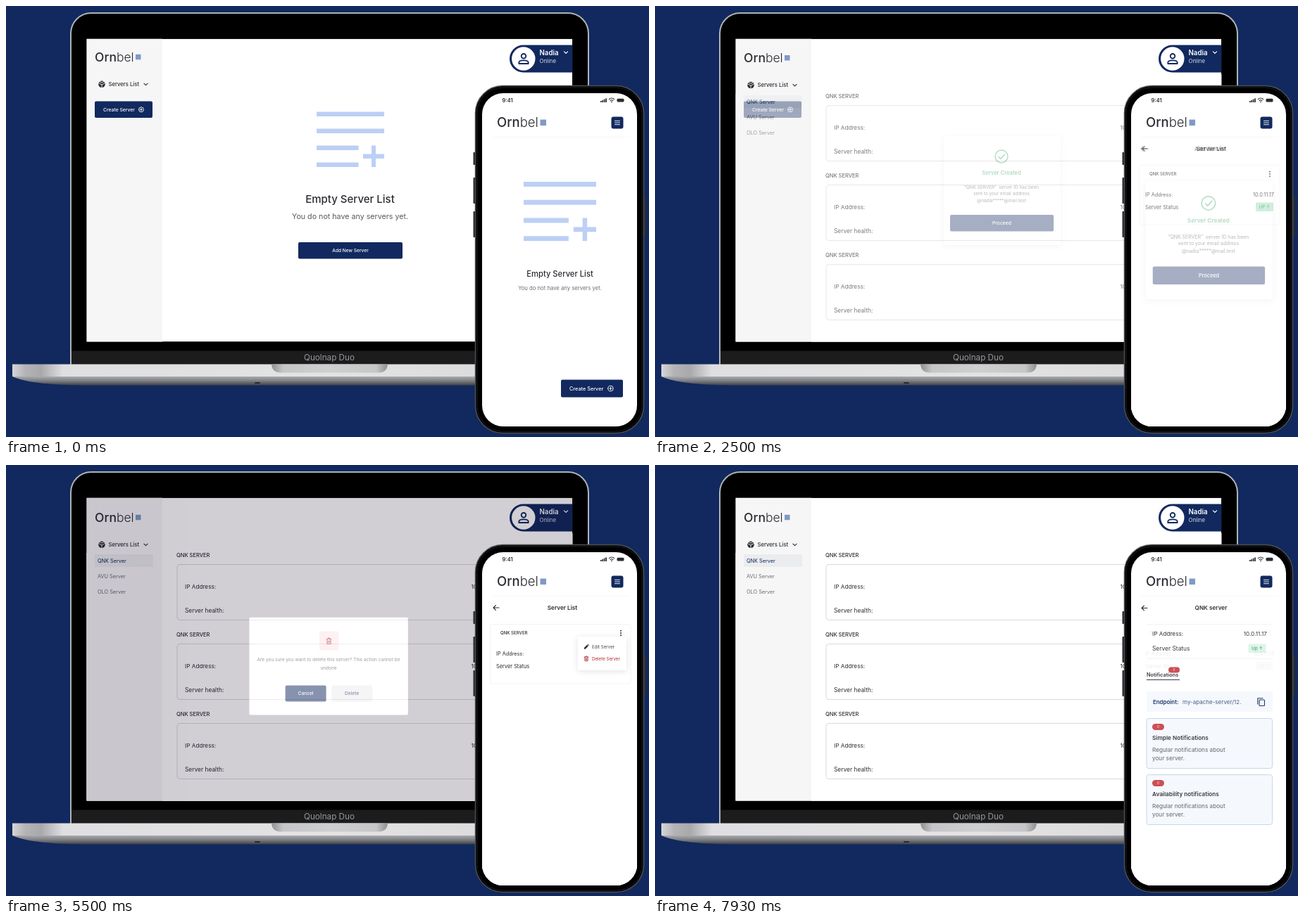
Write an HTML page that moves like this. It is 913 by 613 pixels and loops after 8 s.

```html
<!DOCTYPE html>
<html lang="en">
<head>
<meta charset="utf-8">
<title>Server dashboard on laptop and phone</title>
<style>
html, body { margin: 0; width: 100%; height: 100%; overflow: hidden; background: #11295e; }
svg { display: block; width: 100%; height: 100%; font-family: Inter, "Open Sans", sans-serif; }
</style>
</head>
<body>
<svg id="stage" viewBox="0 0 913 613" xmlns="http://www.w3.org/2000/svg"></svg>
<script>
const NAVY = '#11295e', INK = '#2b2d33', GREY = '#6b6e75', RED = '#b3262e', GREEN = '#2fa565';
const BRAND = ['Orn', 'bel'], USER = 'Nadia', IP = '10.0.11.17';
const MAIN = 'QNK', OTHERS = ['AVU', 'OLO'];
const LOOP = 8000;

// Drawing helpers; text y is the middle of the capitals
const text = (x, y, s, size, fill = INK, weight = 400, anchor = 'start') =>
  `<text x="${x}" y="${(y + size * 0.36).toFixed(2)}" font-size="${size}" fill="${fill}" font-weight="${weight}" text-anchor="${anchor}">${s}</text>`;
const mid = (x, y, s, size, fill, weight) => text(x, y, s, size, fill, weight, 'middle');
const rect = (x, y, w, h, fill, r = 0, extra = '') =>
  `<rect x="${x}" y="${y}" width="${w}" height="${h}" rx="${r}" fill="${fill}" ${extra}/>`;
const line = (d, color, w = 1, extra = '') =>
  `<path d="${d}" fill="none" stroke="${color}" stroke-width="${w}" stroke-linecap="round" stroke-linejoin="round" ${extra}/>`;
const group = (id, body) => `<g id="${id}">${body}</g>`;
const at = (x, y, k, body) => `<g transform="translate(${x} ${y}) scale(${k})">${body}</g>`;
const button = (x, y, w, h, label, size, fill = NAVY, color = '#fff') =>
  rect(x, y, w, h, fill, 2) + mid(x + w / 2, y + h / 2, label, size, color, 500);
const shadow = 'filter="url(#soft)"';

const trash = (x, y, k, c) => at(x, y, k,
  line('M-4 -3.5H4M-1.5 -4.8H1.5M-3 -3.2V4.4H3V-3.2M-1 -0.6V2M1 -0.6V2', c, 1.3));
const pencil = (x, y, k) => at(x, y, k,
  `<path d="M-4.5 4.5V2L1.6 -4.1 4.1 -1.6 -2 4.5ZM2.4 -4.7l1-.9 2.3 2.3-.9 1Z" fill="${INK}"/>`);
const arrow = (x, y) => line(`M${x + 4} ${y}H${x - 4}m3.4 -3.4l-3.4 3.4 3.4 3.4`, INK, 1.2);
const chevron = (x, y) => `M${x - 2.6} ${y - 1.2}l2.6 2.6 2.6 -2.6`;
const plusIcon = (x, y, r) =>
  line(`M${x - r} ${y}a${r} ${r} 0 1 0 ${2 * r} 0a${r} ${r} 0 1 0 ${-2 * r} 0M${x - r / 2} ${y}h${r}M${x} ${y - r / 2}v${r}`, '#fff', 0.9);
const logo = (x, y, size, box, boxX) =>
  `<text x="${x}" y="${y + size * 0.36}" font-size="${size}" fill="${INK}"><tspan font-weight="500">${BRAND[0]}</tspan><tspan font-weight="300">${BRAND[1]}</tspan></text>`
  + rect(boxX, y - box / 2, box, box, '#8199c6');

const emptyIcon = () => {
  const c = '#bccff5';
  return [0, 24].map(y => rect(0, y, 96, 6.5, c)).join('')
    + [48, 72].map(y => rect(0, y, 59.5, 6.5, c)).join('')
    + rect(66, 60, 30, 6.4, c) + rect(78, 48, 6, 30.5, c);
};

// 166 x 155 confirmation card
const successCard = () =>
  rect(0, 0, 166, 155, '#fff', 2, shadow)
  + `<circle cx="82" cy="29" r="9" fill="none" stroke="${GREEN}" stroke-width="1.4"/>`
  + line('M78 29.5l3 3 5.5 -6.5', GREEN, 1.5)
  + mid(82, 52, 'Server Created', 7.6, GREEN, 600)
  + mid(82, 73, `“${MAIN} SERVER”&#160; server ID has been`, 6.4, '#44464c')
  + mid(82, 82, 'sent to your email address', 6.4, '#44464c')
  + mid(82, 91.5, '@nadia*****@mail.test', 6.4, '#44464c')
  + button(9, 112, 147, 23.5, 'Proceed', 6.8);

const field = (x, y, w, h, label, size, hint = '') =>
  text(x, y, label, size, '#55585f')
  + rect(x, y + 8, w, h, '#fff', 2, 'stroke="#c9cbd0"')
  + text(x + 5, y + 8 + h / 2, hint, size * 0.85, '#b9bcc3');

// Laptop
const lapScreen = (fill) => rect(114.5, 46.7, 689.7, 430.8, fill);
const row = i => {
  const y = 113 * i;
  return text(242, 128 + y, MAIN + ' SERVER', 7.5, INK, 500)
    + rect(243, 141.5 + y, 544, 79, '#fff', 4, 'stroke="#d9d9dc"')
    + text(254, 173.5 + y, 'IP Address:', 8.2) + text(660.5, 173.5 + y, IP, 8.2)
    + text(254, 206.5 + y, 'Server health:', 8.4);
};
const laptopMain = body => rect(222, 97, 583, 381, '#fff') + body;
const dim = lapScreen('rgba(12,2,28,.38)');

const laptop =
  `<path d="M92 510V39A29 29 0 0 1 121 10H798A29 29 0 0 1 827 39V510Z" fill="#000" stroke="#b0b3b9" stroke-width="2"/>`
  + rect(93, 490.5, 733, 19.5, '#1c1c1d')
  + mid(459, 500, 'Quolnap Duo', 11.7, '#96979a', 400)
  + `<path d="M9 509.500H906V527H9Z" fill="url(#deck)"/>`
  + `<path d="M9 527H906V539.500H118C70 539.500 28 536 9 527Z" fill="url(#under)"/>`
  + `<path d="M377 509.500H542Q541 521.500 529 521.500H390Q378 521.500 377 509.500Z" fill="url(#notch)"/>`
  + rect(353, 535, 8, 2, '#2a2a2c', 1)
  + `<g clip-path="url(#lapClip)">`
  + lapScreen('#fff') + rect(114, 46, 108, 432, '#f6f6f7')
  + rect(715, 55.5, 130, 39, NAVY, 19.5)
  + `<circle cx="734.8" cy="75" r="16.7" fill="#fff"/><circle cx="735" cy="71.3" r="3.3" fill="none" stroke="${NAVY}" stroke-width="1.8"/>`
  + line('M728.3 82V80.5Q728.3 77.3 735 77.3T741.7 80.5V82Z', NAVY, 1.8)
  + text(757.5, 66.5, USER, 9.7, '#fff', 600) + text(757.5, 78.5, 'Online', 7.8, '#d5dbe8')
  + line(chevron(795, 66), '#fff', 1.2)
  + group('lapEmpty',
      at(441, 150.5, 1, emptyIcon())
      + mid(488.5, 275, 'Empty Server List', 15, INK, 500)
      + mid(488.5, 299, 'You do not have any servers yet.', 10.7, '#55585f')
      + button(415, 336, 148, 23.5, 'Add New Server', 6.6))
  + rect(126, 135.5, 82, 23.5, NAVY, 2) + text(138, 147.3, 'Create Server', 6.8, '#fff', 500) + plusIcon(192, 147.3, 3.5)
  + group('lapAdd', laptopMain(
      mid(489, 178, 'Add Server', 11.3, INK, 600)
      + field(415, 219, 148, 20, 'Server Name', 7.7)
      + field(415, 260, 148, 20, 'IP Address(optional)', 7.7)
      + button(415, 342, 148, 23.5, 'Done', 6.8)))
  + group('lapDone', laptopMain(at(410, 185, 1, successCard())))
  + group('lapList',
      rect(114, 125, 108, 353, '#f6f6f7')
      + rect(126, 127, 83, 18, '#ebecee')
      + text(130, 136, MAIN + ' Server', 7.3, NAVY)
      + OTHERS.map((n, i) => text(130, 158 + i * 22.3, n + ' Server', 7.3, GREY)).join('')
      + laptopMain([0, 1, 2].map(row).join('')))
  + group('lapHead',
      logo(126, 72.5, 17.5, 7.5, 184)
      + `<circle cx="136" cy="111.3" r="4.8" fill="${INK}"/>`
      + line('M131.6 109.7L136 112l4.4 -2.3M136 112v4.5M133 107.5l3 1.5 3 -1.5', '#f6f6f7', 0.9)
      + text(145.5, 111.3, 'Servers List', 7.7, INK, 500) + line(chevron(198.5, 111.3), INK, 1.1))
  + group('lapMenu',
      rect(598, 167, 90, 62, '#fff', 2, shadow)
      + pencil(612, 187.5, 0.95) + text(625, 187.5, 'Edit Server', 7.5, '#44464c')
      + trash(612, 206.5, 0.95, RED) + text(625, 207, 'Delete Server', 7.5, '#44464c'))
  + group('lapEdit', dim
      + rect(325, 167, 266, 239, '#fff', 2, shadow)
      + mid(458, 199, 'Edit Server', 11.3, INK, 600)
      + rect(325, 210.5, 266, 1, '#ececee')
      + field(384, 233.5, 148, 19, 'Server Name', 7.7)
      + field(384, 273.5, 148, 19, 'IP Address(optional)', 7.7)
      + button(384, 357, 148, 23, 'Done', 6.8))
  + group('lapDelete', dim
      + rect(345.4, 216.7, 225.4, 138.8, '#fff', 2)
      + rect(445, 236.5, 27, 27, '#fce4e4', 2) + trash(458.5, 250.5, 0.85, RED)
      + mid(458, 277, 'Are you sure you want to delete this server? This action cannot be', 6.5, '#3a3c42')
      + mid(458, 288.5, 'undone', 6.5, '#3a3c42')
      + button(396.6, 313.4, 58, 23, 'Cancel', 6.6)
      + button(462.2, 313.4, 58, 23, 'Delete', 6.6, '#ebebed', NAVY))
  + '</g>';

// Phone
const phoneMain = body => rect(676, 190, 220, 408, '#fff') + body;
const phoneTitle = (x, s) => arrow(x, 203) + mid(x + 94, 203.3, s, 8.2, INK, 600);
const pill = (x, y, w, h) => rect(x, y, w, h, '#c94148', h / 2) + mid(x + w / 2, y + h / 2, '0', 4.5, '#fff');
const badge = (x, y, s, fill) => rect(x, y, 25, 12.5, fill, 1.5) + mid(x + 12.5, y + 6.2, s, 6.4, GREEN, 500);
const notice = (y, title) =>
  rect(698, y + 0.5, 178.5, 71, '#f5f9fe', 3, 'stroke="#c5d4e9"')
  + pill(706, y + 8, 17, 9)
  + text(706, y + 28, title, 8.2, INK, 600)
  + text(706, y + 45, 'Regular notifications about', 8.2, '#55585f')
  + text(706, y + 57.5, 'your server.', 8.2, '#55585f');

const phone =
  [[208, 18], [244, 37], [292, 37]].map(([y, h]) => rect(663.5, y, 4, h, '#2b2c2f', 1)).join('')
  + rect(905, 272, 3.5, 55, '#2b2c2f', 1)
  + rect(666.5, 113.5, 239, 494, '#000', 39, 'stroke="#4d4f53" stroke-width="1.5"')
  + rect(669, 116, 234, 489, 'none', 36.5, 'stroke="#1d1e20"')
  + `<g clip-path="url(#phClip)">`
  + rect(676, 124, 220, 474, '#fff')
  + text(704.5, 134, '9:41', 7.5, INK, 600)
  + [0, 1, 2, 3].map(i => rect(844 + i * 2.4, 135 - i * 1.2, 1.7, 2 + i * 1.2, INK)).join('')
  + line('M856.5 132.5q3.5 -3 7 0M858 134.6q2 -1.7 4 0', INK, 1.2) + `<circle cx="860" cy="136.3" r="0.9" fill="${INK}"/>`
  + rect(867.5, 131.8, 10, 4.6, INK, 1.5)
  + logo(697, 165.8, 18.5, 8.5, 758.5)
  + rect(859.5, 157.5, 17, 17, NAVY, 3)
  + line('M864.5 163.3h7M864.5 166h7M864.5 168.7h7', '#fff', 0.9)
  + rect(690, 186, 196, 0.8, '#f6f6f7')
  + group('phEmpty',
      at(735, 250, 1.073, emptyIcon())
      + mid(786.5, 380.5, 'Empty Server List', 11.2, INK, 500)
      + mid(786.5, 401, 'You do not have any servers yet.', 7.7, '#6b6e75')
      + rect(788, 531.5, 88, 25, NAVY, 2) + text(800, 544, 'Create Server', 7.3, '#fff', 500) + plusIcon(858.5, 544, 3.8))
  + group('phAdd', phoneMain(phoneTitle(694, 'Add Server')
      + field(688, 240, 198.5, 21, 'Server Name', 7, 'Enter Server Name')
      + field(688, 290, 198.5, 21, 'IP Address (optional)', 7)
      + button(687.5, 367, 199, 25, 'Done', 7.4)))
  + group('phDone', phoneMain(phoneTitle(694, 'Add Server') + at(697, 249, 1.084, successCard())))
  + group('phList', phoneMain(phoneTitle(696, 'Server List')
      + rect(688, 226.5, 199, 84.5, '#fff', 2, 'stroke="#f3f3f5"')
      + text(702, 238.5, MAIN + ' SERVER', 6.1, INK, 500)
      + [-3.2, 0, 3.2].map(d => `<circle cx="873" cy="${239 + d}" r="1" fill="${INK}"/>`).join('')
      + text(696, 268, 'IP Address:', 7.3) + text(879, 268, IP, 7.4, INK, 400, 'end')
      + text(696, 286, 'Server Status', 7.4) + badge(853, 279.5, 'UP ↑', '#b5e5ca')))
  + group('phMenu',
      rect(812, 244, 69, 48, '#fff', 2, shadow)
      + pencil(824, 258.5, 0.7) + text(832, 258.8, 'Edit Server', 6.2, '#44464c')
      + trash(824, 275.5, 0.7, RED) + text(832, 275.5, 'Delete Server', 6.2, RED))
  + group('phEdit',
      rect(676, 142, 220, 456, '#fff')
      + arrow(693, 165.5) + mid(786, 165.5, 'Edit Server', 8.2, INK, 600)
      + field(691, 201.5, 195, 20, 'Server Name', 7, 'Enter Server Name')
      + field(691, 251.5, 195, 20, 'IP Address (optional)', 7)
      + button(687.5, 328, 199, 25, 'Done', 7.4))
  + group('phDelete',
      rect(676, 124, 220, 474, 'rgba(217,217,217,.76)')
      + rect(698, 210.5, 178.5, 150.5, '#fff', 3, shadow)
      + rect(773, 232, 29, 29, '#fce0e0', 3) + trash(787, 246.5, 1, '#c9333b')
      + ['Are you sure you want to delete', 'this server? This action cannot be', 'undone']
          .map((s, i) => mid(787, 275.5 + i * 12.4, s, 7.1, '#3a3c42')).join('')
      + button(720.5, 315, 62.5, 25, 'Cancel', 7.3)
      + button(791.5, 315, 62.5, 25, 'Delete', 7.3, '#e9e9eb', NAVY))
  + group('phInfo', phoneMain(arrow(695, 203.5) + mid(789.5, 203.5, MAIN + ' server', 8.2, INK, 600)
      + rect(698, 226, 179, 0.8, '#f1f1f3') + rect(698, 275, 179, 0.8, '#f1f1f3')
      + text(706, 240.5, 'IP Address:', 8.2) + text(869, 240.5, IP, 8.2, INK, 400, 'end')
      + text(706, 261, 'Server Status', 8.4) + badge(842.5, 254.5, 'Up ↑', '#dcf5e6')
      + text(698, 298.5, 'Notifications', 7.3, INK, 600) + rect(698, 305, 47, 1, INK) + pill(729, 287.5, 16, 8)
      + rect(698, 322, 179, 29, '#f5f9fe', 2)
      + text(707, 337, 'Endpoint:', 7.9, NAVY, 600) + text(749, 337, 'my-apache-server/12.', 8, '#3f5078')
      + rect(858, 334, 7.5, 8.5, 'none', 1, `stroke="${NAVY}" stroke-width="1.1"`)
      + line('M855.8 340V331.7H863', NAVY, 1.1)
      + notice(360, 'Simple Notifications') + notice(440, 'Availability notifications')))
  + '</g>';

const grad = (id, dir, stops) => `<linearGradient id="${id}" ${dir}>`
  + stops.map(([o, c]) => `<stop offset="${o}" stop-color="${c}"/>`).join('') + '</linearGradient>';
const down = 'x1="0" y1="0" x2="0" y2="1"';

document.getElementById('stage').innerHTML = '<defs>'
  + grad('deck', '', [[0, '#d6d6d8'], [0.02, '#b4b4b7'], [0.045, '#a9a9ac'], [0.08, '#dfdfe1'], [0.5, '#e3e3e4'], [1, '#d5d5d7']])
  + grad('under', down, [[0, '#a9aaad'], [0.5, '#7d7e82'], [1, '#3f4146']])
  + grad('notch', '', [[0, '#8f9093'], [0.1, '#c6c6c8'], [0.5, '#cecfd0'], [0.9, '#c6c6c8'], [1, '#8f9093']])
  + `<clipPath id="lapClip">${lapScreen('#000')}</clipPath>`
  + `<clipPath id="phClip">${rect(676, 124, 220, 474, '#000', 30)}</clipPath>`
  + '<filter id="soft" x="-20%" y="-20%" width="140%" height="140%"><feDropShadow dx="0" dy="1.5" stdDeviation="4" flood-color="#000" flood-opacity=".11"/></filter>'
  + '</defs>' + laptop + phone;

const $ = id => document.getElementById(id);
const show = (id, a) => {
  $(id).style.display = a > 0 ? '' : 'none';
  $(id).setAttribute('opacity', a);
};

// Stepped fade 0..1: n even steps, the first at a and the last at b
function steps(t, a, b, n, ease = 1) {
  if (t < a) return 0;
  const k = Math.min(n, 1 + Math.floor((t - a) / (b - a) * (n - 1) + 1e-6));
  return 1 - Math.pow(1 - k / n, ease);
}

function draw(t) {
  const add = steps(t, 410, 800, 6), done = steps(t, 1200, 1460, 4);
  const list = steps(t, 2110, 2680, 8), menu = steps(t, 2990, 3460, 7);
  const lapBack = steps(t, 5082, 5330, 4), ask = steps(t, 5970, 6280, 5, 2);

  for (const d of ['lap', 'ph']) {
    show(d + 'Add', add);
    show(d + 'Done', done);
    show(d + 'List', list);
  }
  $('lapHead').setAttribute('transform', `translate(0 ${2 * list})`);
  show('lapMenu', menu * (1 - lapBack));
  show('lapEdit', steps(t, 4180, 4280, 2) * (1 - lapBack));
  show('lapDelete', steps(t, 5500, 5570, 2) * (1 - steps(t, 6940, 7540, 9, 0.85)));

  show('phMenu', t < 4010 ? menu : steps(t, 5165, 5330, 3) * (1 - ask));
  show('phEdit', t < 4010 ? 0 : 1 - steps(t, 5000, 5330, 5, 3.5));
  show('phDelete', ask * (1 - steps(t, 6940, 7165, 4)));
  show('phInfo', 0.92 * steps(t, 7880, 7930, 2));
}

function tick(now) {
  draw(now % LOOP);
  requestAnimationFrame(tick);
}
draw(0);
requestAnimationFrame(tick);
</script>
</body>
</html>
```
